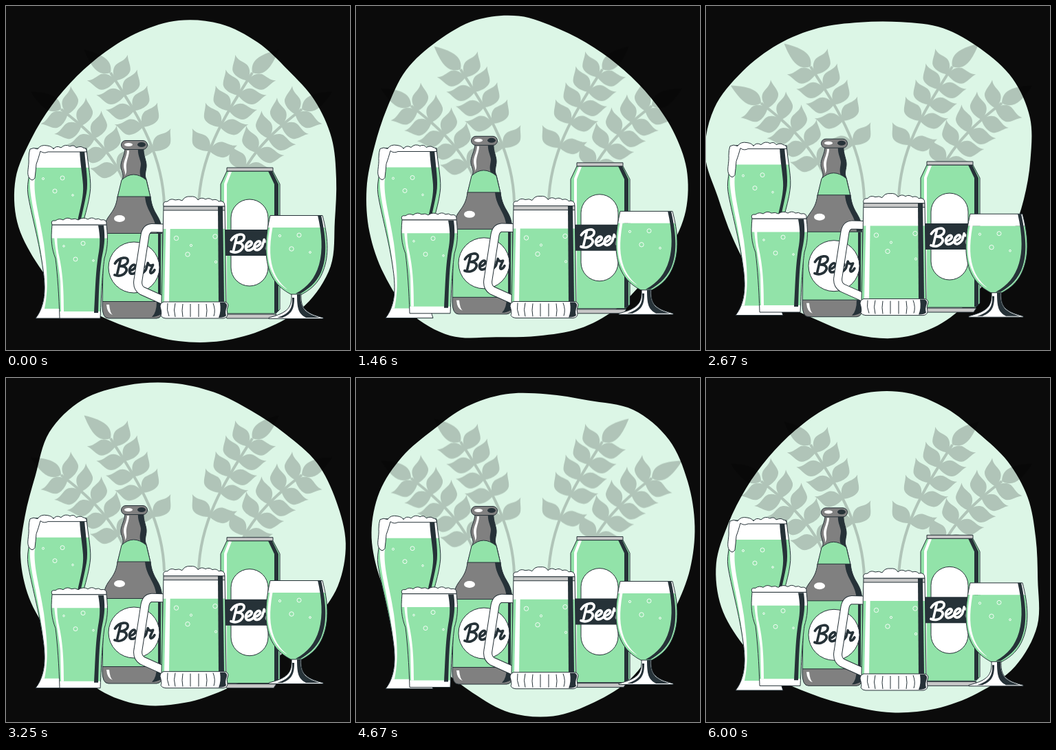
An HTML page that plays this animation: 500 px wide and 500 px high, repeating every 6040 ms.

```html
<!DOCTYPE html>
<html lang="en">
<head>
<meta charset="utf-8">
<title>Beer glasses</title>
<style>
html, body { margin: 0; width: 100%; height: 100%; overflow: hidden; background: #0b0b0b; }
svg { display: block; width: 100vw; height: 100vh; }
.g { fill: #92e3a9; }
.w { fill: #fff; }
.d { fill: #263238; }
.m { fill: #808080; }
.l { fill: #c7c7c7; }
.o { stroke: #263238; stroke-width: 1; stroke-linejoin: round; }
.n { fill: none; }
.bubbles circle { fill: none; stroke: #fff; stroke-width: .9; }
.script, .handle { fill: none; stroke-linecap: round; stroke-linejoin: round; }
.script { stroke-width: 3.5; }
</style>
</head>
<body>
<svg viewBox="0 0 500 500">
<defs>
  <g id="beer">
    <path d="M10 3L4 25M2 8C8-1 22-2 20 6C19 10 13 12 9 12C18 12 19 17 17 20C14 25 7 27 1 24"/>
    <path d="M22 19C28 18 32 14 30 11.500C27 9 21 15 22 20C23 25 29 24 34 19C40 18 44 14 42 11.500C39 9 33 15 34 20C35 25 41 24 45 18L48 9C49 13 52 13 55 12L51 20C50 25 54 24 57 19"/>
  </g>
  <path id="leaf" d="M0 0C1-9 5-17 13-19C21-20 27-17 35-22C31-16 31-8 27-2C22 5 8 4 0 0Z"/>
  <path id="bud" d="M0 0C15-9 14-24 0-51C-14-24-15-9 0 0Z"/>
  <path id="handle" d="M228 323L212 322.500Q204 323 202 333L192 398Q190 409 198 414L227 427"/>
  <path id="bottle" d="M162 277C159 304 143 303 142 328L140 436Q140 454 149 454H219Q228 454 228 436L227 328C225 303 213 304 210 277Z"/>
  <path id="can" d="M321 240H388L398 259V441L392 447H318L312 441V259Z"/>
  <path id="goblet" d="M384 304.500C377 335 375 362 383 385C391 406 405 414 414 419H430C439 414 453 406 461 385C470 362 468 335 460 304.500Z"/>
  <path id="pint" d="M67 318H146C149 342 147 354 143 367C140 390 139 410 137 454H78C77 420 75 392 72 367C66 352 65 340 67 318Z"/>
  <path id="tall" d="M39 207H117C119 232 125 255 122 272C119 296 107 325 105 350C103 380 103 430 112 454H43C57 436 58 412 54 384C49 345 36 300 32 274C29 255 38 235 39 207Z"/>
  <clipPath id="inBottle"><use href="#bottle"/></clipPath>
  <clipPath id="inCan"><use href="#can"/></clipPath>
  <clipPath id="inGoblet"><use href="#goblet"/></clipPath>
  <clipPath id="inPint"><use href="#pint"/></clipPath>
  <clipPath id="inTall"><use href="#tall"/></clipPath>
</defs>

<path id="blob" fill="#dcf6e6"/>
<g id="wheat" opacity=".2"></g>

<g data-delay="0">
  <g clip-path="url(#inTall)">
    <path class="w" d="M20 200H130V460H20Z"/>
    <path class="g" d="M20 235H130V440H20Z"/>
    <path class="w" d="M35 250C33 275 43 305 49 345C56 390 57 415 51 440H56C62 412 60 385 55 345C50 310 39 277 42 250Z"/>
    <path class="d" d="M107 210H114C116 235 120 256 117 272C112 300 104 325 101 355L99 440H95C95 380 98 340 104 312C109 290 113 275 112 260C111 245 108 230 107 210Z"/>
  </g>
  <use href="#tall" class="o n"/>
  <path class="w o" d="M34 250C29 244 34 233 33 222Q33 213 35 208Q40 205 46 208Q50 201 60 203Q67 204 69 208Q73 202 80 206Q86 200 93 204Q99 201 102 206Q109 203 112 206Q118 207 117 212H61Q55 215 50 211Q47 222 44 230Q43 242 42 250Q38 256 34 250Z"/>
  <g class="bubbles"><circle cx="82" cy="250" r="3"/><circle cx="54" cy="251" r="1.5"/><circle cx="71" cy="269" r="3"/><circle cx="97" cy="275" r="1.3"/></g>
</g>

<g data-delay="1000">
  <path class="m o" d="M173 206H200C199 217 205 226 204 234C203 242 201 246 204 252L210 278H162L169 252C172 246 168 242 167 234C166 226 173 217 173 206Z"/>
  <path class="d" d="M192 207H200C199 217 205 226 204 234C203 242 201 246 204 252L196 249C193 240 196 235 196 229C195 222 191 216 192 207Z"/>
  <path class="w" d="M176 210C176 218 171 225 171 232C171 238 174 241 173 246C177 241 174 235 175 230C176 222 179 217 179 210Z"/>
  <path class="g o" d="M168 253Q185 237 204 253L210 278H162Z"/>
  <rect class="m o" x="167.500" y="195.500" width="38" height="13" rx="6.500"/>
  <ellipse class="w" cx="178" cy="201.500" rx="6" ry="2.500"/>
  <ellipse class="d" cx="197" cy="201.500" rx="6" ry="3.500"/>
  <g clip-path="url(#inBottle)">
    <path class="m" d="M135 275H235V460H135Z"/>
    <path class="d" d="M202 277C204 300 218 306 219 330H232V277ZM219 429H230V446Q219 452 212 452Q219 446 219 429Z"/>
    <path class="g o" d="M135 330.500H235V429.500H135Z"/>
    <path class="d" d="M221 331H225V429H221Z"/>
    <path class="w" d="M146 434H150Q151 446 155 449Q147 447 146 434Z"/>
  </g>
  <use href="#bottle" class="o n"/>
  <ellipse class="w" cx="165" cy="309" rx="8" ry="5"/>
  <circle class="w o" cx="186" cy="380" r="37"/>
  <use href="#beer" class="script" stroke="#263238" transform="translate(156 366) rotate(-2) scale(1.04)"/>
</g>

<g data-delay="500">
  <g clip-path="url(#inPint)">
    <path class="w" d="M60 315H150V456H60Z"/>
    <path class="g" d="M60 337.500H150V444H60Z"/>
    <path class="w" d="M70 325C69 345 76 370 79 400L80 444H84C84 400 81 380 76 358C74 345 74 335 75 325Z"/>
    <path class="d" d="M134 319H142C145 340 142 352 139 367C135 395 135 420 134 446H128C130 410 130 390 134 363C137 347 137 335 134 319Z"/>
  </g>
  <use href="#pint" class="o n"/>
  <path class="w o" d="M67 318Q64 311 72 312Q77 308 83 311Q89 306 95 310Q101 308 105 311Q112 306 119 310Q125 306 130 310Q135 308 138 311Q147 309 146 318Z"/>
  <g class="bubbles"><circle cx="112" cy="345" r="3"/><circle cx="84" cy="349" r="1.300"/><circle cx="101" cy="368" r="3"/><circle cx="127" cy="370" r="1.300"/></g>
</g>

<g data-delay="500">
  <g clip-path="url(#inCan)">
    <path class="g" d="M310 238H400V450H310Z"/>
    <path class="w" d="M324 240L317 258V440H321V259L328 241Z"/>
    <path class="d" d="M381 240L390 259V446H396V259L387 240Z"/>
    <rect class="w o" x="327" y="281" width="54" height="126" rx="27"/>
    <path class="d" d="M310 325H400V363H310Z"/>
  </g>
  <use href="#can" class="o n"/>
  <path class="l o" d="M321 235H388V240H321ZM317 448H393L389 454H321Z"/>
  <use href="#beer" class="script" stroke="#fff" transform="translate(325 332) rotate(-2) scale(1.04)"/>
</g>

<g data-delay="0">
  <use href="#handle" class="handle" stroke="#263238" stroke-width="13"/>
  <use href="#handle" class="handle" stroke="#fff" stroke-width="11"/>
  <path class="w" d="M229 291H318L320 432H226Z"/>
  <path class="g" d="M228.500 324H318.500L320 432H226Z"/>
  <path class="l" d="M229 291H318V297H229Z"/>
  <path class="w" d="M233 299H239L237 430H230Z"/>
  <path class="d" d="M308 291H315L317 431H309Z"/>
  <path class="o n" d="M229 291H318L320 432H226ZM229 297H318"/>
  <path class="w o" d="M229 291Q227 284 235 284Q239 279 246 282Q252 280 256 283Q260 276 268 277Q276 276 279 282Q284 277 290 281Q295 278 300 282Q306 280 309 284Q318 282 318 291Z"/>
  <path class="w o" d="M229 430Q224 432 224 437Q227 447 225 450Q227 454 232 454H316Q322 453 322 448Q320 442 323 435Q322 430 317 430Z"/>
  <path class="d" d="M311 431H318Q322 433 321 437Q318 445 320 450Q318 453 309 453Q313 444 311 431Z"/>
  <path class="o n" d="M235 432Q233 442 237 451M246 432Q243 442 246 452M257 433Q255 443 257 452M268 433V452M280 433V452M291 433Q293 443 291 452M301 432Q305 442 302 451"/>
  <g class="bubbles"><circle cx="247.500" cy="337.500" r="3.200"/><circle cx="269" cy="348" r="1.600"/><circle cx="264" cy="361" r="3.200"/><circle cx="304" cy="335" r="3.200"/><circle cx="305" cy="372" r="1.600"/></g>
</g>

<g data-delay="1000">
  <path class="w o" d="M415 418H429C428 438 433 446 461 453V454.500H382V453C410 446 416 438 415 418Z"/>
  <path class="d" d="M423 419H428C428 438 433 446 456 453H436C425 447 423 440 423 419ZM416 424C417 440 411 448 394 453H402C416 447 419 440 419 424Z"/>
  <g clip-path="url(#inGoblet)">
    <path class="w" d="M370 300H470V322H370Z"/>
    <path class="g" d="M370 322H470V425H370Z"/>
    <path class="w" d="M387 306C379 340 377 365 387 387C394 402 402 408 409 412C397 402 390 392 386 374C382 355 385 330 391 306Z"/>
    <path class="d" d="M453 304H458C466 340 467 365 458 387C450 404 438 412 428 418H421C439 408 449 396 455 376C461 355 459 330 453 304Z"/>
  </g>
  <use href="#goblet" class="o n"/>
  <g class="bubbles"><circle cx="426" cy="333" r="3"/><circle cx="398" cy="334" r="1.600"/><circle cx="415" cy="353" r="3.200"/><circle cx="442" cy="358" r="1.400"/></g>
</g>
</svg>

<script>
const LOOP = 6040, SPIN = 6080, RISE = 10, CENTER = 251;
const blob = document.getElementById('blob');
const wheat = document.getElementById('wheat');
const items = [...document.querySelectorAll('[data-delay]')];

// Blob radii, one every 15 degrees clockwise from the right.
const radii = [229, 235, 255, 260, 252, 244, 236, 229, 230, 238, 240, 243,
  237, 222, 213, 210, 213, 221, 230, 233, 229, 224, 228, 230];

function closedCurve(points) {
  const at = i => points[(i + points.length) % points.length];
  let d = 'M' + at(0);
  points.forEach((p, i) => {
    const [a, b, c, e] = [at(i - 1), p, at(i + 1), at(i + 2)];
    const c1 = b.map((v, k) => v + (c[k] - a[k]) / 6);
    const c2 = c.map((v, k) => v - (e[k] - b[k]) / 6);
    d += 'C' + [c1, c2, c].join(' ');
  });
  return d + 'Z';
}

blob.setAttribute('d', closedCurve(radii.map((r, i) => {
  const a = i * Math.PI / 12;
  return [CENTER + r * Math.cos(a), CENTER + r * Math.sin(a)];
})));

// A stem with paired leaves and a bud at its tip.
function sprig([p0, p1, p2, p3], budAngle, nodes) {
  const bez = (t, k) => {
    const u = 1 - t;
    return u * u * u * p0[k] + 3 * u * u * t * p1[k] + 3 * u * t * t * p2[k] + t * t * t * p3[k];
  };
  let out = `<path d="M${p0}C${p1} ${p2} ${p3}" fill="none" stroke="#000" stroke-width="4"/>`;
  out += `<use href="#bud" transform="translate(${p0}) rotate(${budAngle})"/>`;
  for (const t of nodes) {
    const x = bez(t, 0), y = bez(t, 1);
    const dx = bez(t - .01, 0) - x, dy = bez(t - .01, 1) - y;
    const turn = Math.atan2(dx, -dy) * 180 / Math.PI;
    for (const side of [1, -1])
      out += `<use href="#leaf" transform="translate(${x} ${y}) rotate(${turn}) scale(${side} 1)"/>`;
  }
  return out;
}

const half =
  sprig([[152, 97], [185, 150], [228, 210], [230, 290]], -49, [.07, .2, .33, .46, .64]) +
  sprig([[80, 150], [125, 185], [172, 225], [185, 300]], -60, [.07, .22, .37, .52, .68]);
wheat.innerHTML = `<g>${half}</g><g transform="matrix(-1 0 0 1 510 0)">${half}</g>`;

function lift(t, period) {
  if (t < 0) return 0;
  const phase = t / period % 1;
  return -RISE * (1 - Math.abs(2 * phase - 1));
}

function draw(now) {
  const t = now % LOOP;
  blob.setAttribute('transform', `rotate(${360 * t / SPIN} ${CENTER} ${CENTER})`);
  wheat.setAttribute('transform', `translate(0 ${lift(t, 6000)})`);
  for (const el of items)
    el.setAttribute('transform', `translate(0 ${lift(t - el.dataset.delay, 1500)})`);
}

const start = performance.now();
function tick() {
  draw(performance.now() - start);
  requestAnimationFrame(tick);
}
tick();
</script>
</body>
</html>
```
